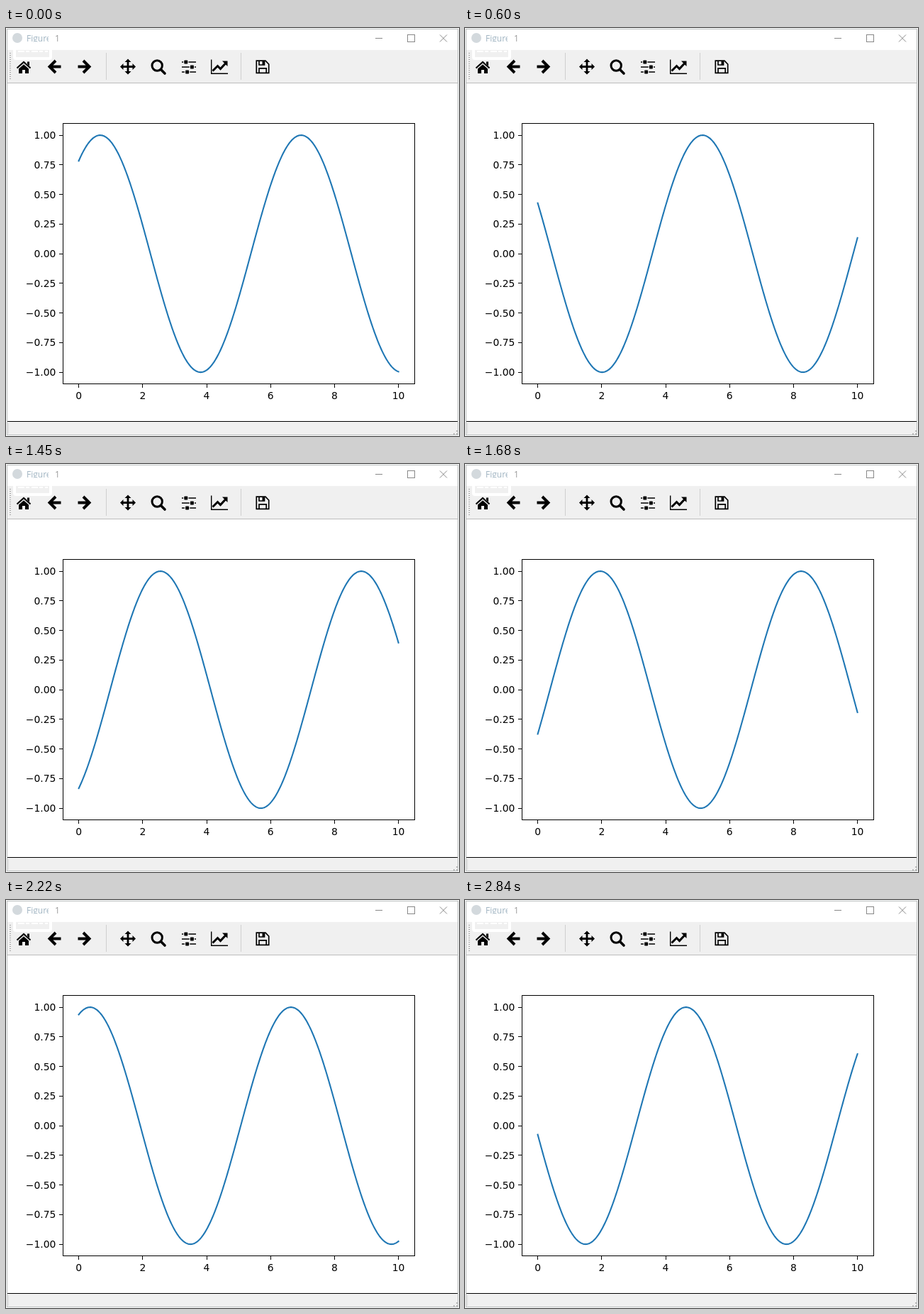
An HTML page that plays this animation: 639 px wide and 575 px high, repeating every 2920 ms.

```html
<!DOCTYPE html>
<html lang="en">
<head>
<meta charset="utf-8">
<title>Sine wave</title>
<style>
html, body { margin: 0; width: 100%; height: 100%; overflow: hidden; background: #fff; }
svg { display: block; }
text { font: 13.89px "DejaVu Sans", sans-serif; }
.title { font: 12px "Open Sans", sans-serif; }
.crisp { shape-rendering: crispEdges; }
.line { fill: none; stroke: #000; }
</style>
</head>
<body>
<svg width="639" height="575" viewBox="0 0 639 575">
  <!-- window frame -->
  <g class="crisp">
    <rect width="639" height="575" fill="#fff"/>
    <path d="M1 31h637v46H1zM1 555h637v19H1z" fill="#f0f0f0"/>
    <path d="M1 77.5H638" stroke="#bdbdbd"/>
    <path d="M1 554.5H638" stroke="#000"/>
    <path d="M3.5 557V572" stroke="#d8d8d8"/>
    <path d="M5.5 35V74" stroke="#a8a8a8" stroke-width="2" stroke-dasharray="1 2"/>
    <path d="M141.5 35V73M331.5 35V73" stroke="#cfcfcf"/>
    <path d="M635 567h2v2h-2zM635 571h2v2h-2zM631 571h2v2h-2z" fill="#b8b8b8"/>
    <rect x="1.5" y="1.5" width="636" height="572" fill="none" stroke="#bcc0c0"/>
  </g>

  <!-- title bar -->
  <circle cx="16" cy="14" r="7" fill="#d3d9dd"/>
  <text class="title" x="29" y="19" fill="#9fb3c1">Figure</text>
  <text class="title" x="69" y="19" fill="#999">1</text>
  <path d="M28 19.5H66V25H28zM60 8h6v16h-6z" fill="#fff"/>
  <g fill="none" stroke="#888">
    <path d="M521 14.5h10M566.5 9.5h10v10h-10z" class="crisp"/>
    <path d="M612 9.5l10 10m0-10l-10 10"/>
  </g>
  <rect x="12" y="24" width="51" height="19" rx="2" fill="none" stroke="#fff" stroke-width="4"/>
  <path d="M17 33H59" stroke="#fff" stroke-width="2" stroke-dasharray="9 2 5 3"/>

  <!-- toolbar icons -->
  <path class="line" d="M15.5 56.5L25 48L34.5 56.5" stroke-width="2.2"/>
  <path d="M30 47.5h3v6l-3-2.7zM18 57.5L25 51.2L32 57.5V64H27V59H23V64H18z"/>
  <g id="arrow" class="line" stroke-width="4">
    <path d="M70 46L61.5 54.5L70 63M62 54.5H77.5"/>
  </g>
  <use href="#arrow" transform="matrix(-1 0 0 1 179 0)"/>
  <g transform="translate(172 54.5)">
    <path class="line" d="M-8 0H8M0 -8V8" stroke-width="2.8"/>
    <path d="M-11 0l4.5-4.5v9zM11 0l-4.5-4.5v9zM0-11l-4.5 4.5h9zM0 11l-4.5-4.5h9z"/>
  </g>
  <circle class="line" cx="213.2" cy="53" r="7.2" stroke-width="3"/>
  <path class="line" d="M218.5 58.5L224 64" stroke-width="3.6" stroke-linecap="round"/>
  <g id="sliders"></g>
  <path class="line" d="M289.7 44.5V64.3H313" stroke-width="1.4"/>
  <path class="line" d="M291.5 60.5L298.5 53.5L302.5 57.5L310 49.5" stroke-width="3"/>
  <path d="M305 46.5h7.5v7.5z"/>
  <path class="line" d="M353.3 46.2H366L370.7 51V63.3H353.3zM357 63V56.8H367.2V63M357 46.5V52H364.5V46.5" stroke-width="1.7"/>
  <path d="M361.5 46h3v6h-3z"/>

  <!-- plot -->
  <g id="ticks"></g>
  <path id="wave" fill="none" stroke="#1f77b4" stroke-width="2.08" stroke-linecap="square" stroke-linejoin="round"/>
  <rect class="line crisp" x="80.5" y="134.5" width="496" height="367" stroke-width="1.1"/>
</svg>
<script>
const $ = id => document.getElementById(id);
const px = x => 102.6 + x * 45.1;
const py = y => 318.1 - y * 167;

$('sliders').innerHTML = [[48, 253.8], [55, 262.4], [62, 255.6]].map(([y, x]) =>
  `<path class="line" d="M248 ${y}H${x - 3.7}M${x + 3.7} ${y}H268" stroke-width="1.7"/>
   <rect x="${x - 2.5}" y="${y - 2.5}" width="5" height="5" rx="1"/>`).join('');

let ticks = '';
for (let x = 0; x <= 10; x += 2) {
  const at = Math.floor(px(x)) + .5;
  ticks += `<path class="line crisp" d="M${at} 502v5"/>
    <text x="${px(x)}" y="523" text-anchor="middle">${x}</text>`;
}
for (let i = -4; i <= 4; i++) {
  const y = py(i / 4), label = (i < 0 ? '\u2212' : '') + Math.abs(i / 4).toFixed(2);
  ticks += `<path class="line crisp" d="M75 ${Math.floor(y) + .5}h5"/>
    <text x="70.3" y="${Math.round(y) + 5}" text-anchor="end">${label}</text>`;
}
$('ticks').innerHTML = ticks;

// Pace of the wave: time in ms, step count, phase
const pace = [
  [0, 0, .9], [600, 8, 2.7], [1060, 14, 4.3], [1450, 19, 5.3],
  [1910, 25, 6.4], [2220, 29, 7.5], [2690, 35, 9], [2840, 37, 9.5]
];
const steps = [{ time: 0, phase: .9 }];
for (let k = 1; k < pace.length; k++) {
  const [t0, n0, p0] = pace[k - 1], [t1, n1, p1] = pace[k];
  for (let n = n0 + 1; n <= n1; n++) {
    const u = (n - n0) / (n1 - n0);
    steps.push({
      time: Math.floor((t0 + (t1 - t0) * u) / 10 + .49) * 10,
      phase: Math.round((p0 + (p1 - p0) * u) * 10) / 10
    });
  }
}

const start = performance.now();
let shown;
function draw() {
  const t = (performance.now() - start) % 2920;
  const step = steps.findLast(s => s.time <= t);
  if (step !== shown) {
    shown = step;
    let d = '';
    for (let i = 0; i <= 400; i++) {
      const x = i / 40;
      d += (i ? 'L' : 'M') + px(x).toFixed(2) + ' ' + py(Math.sin(x + step.phase)).toFixed(2);
    }
    $('wave').setAttribute('d', d);
  }
  requestAnimationFrame(draw);
}
draw();
</script>
</body>
</html>
```
